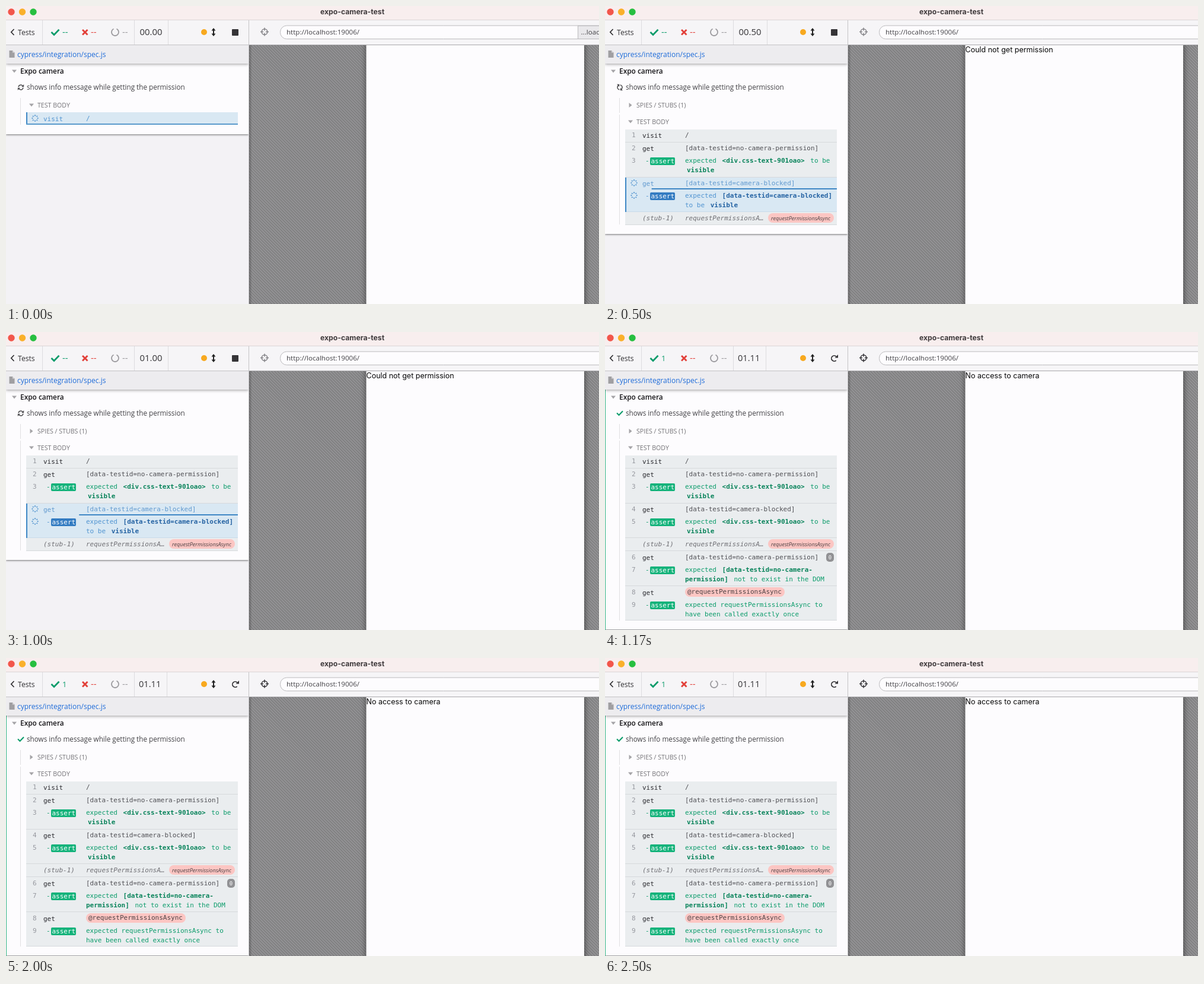
An HTML page with a canvas that plays this animation: 1000 px wide and 502 px high, repeating every 2.67 s.

```html
<!DOCTYPE html>
<html lang="en">
<head>
<meta charset="utf-8">
<title>Camera test run</title>
<style>
  html, body { margin: 0; width: 100%; height: 100%; overflow: hidden; background: #f4f3f5; }
  canvas { display: block; }
</style>
</head>
<body>
<canvas id="stage" width="1000" height="502"></canvas>
<script>
const ctx = document.getElementById('stage').getContext('2d');
const LOOP = 2670, PASSED = 1170, COMMAND_TIMEOUT = 4000;
const STEPS = [0, 170, 330, 500, 670, 830, 1000, PASSED];
const CLOCK = ['00.00', '00.21', '00.35', '00.50', '00.68', '00.84', '01.00', '01.11'];

const UI = '"Open Sans", sans-serif', MONO = '"DejaVu Sans Mono", monospace', SYSTEM = 'Inter, sans-serif';
const INK = '#343336', WHITE = '#fdfcfe', GREEN = '#0c9c6b', RED = '#e2403a';
const BLUE = '#3f87c5', PALE = '#d9e8f3', ROW = '#eaedef', PINK = '#fcc6c3';
const passedColors = [GREEN, '#08835a', '#14b37b'];
const runningColors = ['#5194d1', '#2563a3', '#347cc2'];

function rect(x, y, w, h, color) {
  ctx.fillStyle = color;
  ctx.fillRect(x, y, w, h);
}
function pill(x, y, w, h, r, color) {
  ctx.fillStyle = color;
  ctx.beginPath();
  ctx.roundRect(x, y, w, h, r);
  ctx.fill();
}
function dot(x, y, r, color) {
  ctx.fillStyle = color;
  ctx.beginPath();
  ctx.arc(x, y, r, 0, 7);
  ctx.fill();
}
function polygon(color, ...points) {
  ctx.fillStyle = color;
  ctx.beginPath();
  for (const [x, y] of points) ctx.lineTo(x, y);
  ctx.fill();
}
function stroke(color, width, ...points) {
  ctx.strokeStyle = color;
  ctx.lineWidth = width;
  ctx.beginPath();
  for (const [x, y] of points) ctx.lineTo(x, y);
  ctx.stroke();
}
function arc(x, y, r, from, to, color, width) {
  ctx.strokeStyle = color;
  ctx.lineWidth = width;
  ctx.beginPath();
  ctx.arc(x, y, r, from, to);
  ctx.stroke();
}
function text(str, x, y, color, size = 12, family = UI, style = '') {
  ctx.font = `${style} ${size}px ${family}`;
  ctx.fillStyle = color;
  ctx.fillText(str, x, y);
  return ctx.measureText(str).width;
}
const mono = (str, x, y, color, style) => text(str, x, y, color, 11, MONO, style);

function withShadow(color, blur, dy, paint) {
  ctx.save();
  ctx.shadowColor = color;
  ctx.shadowBlur = blur;
  ctx.shadowOffsetY = dy;
  paint();
  ctx.restore();
}

// Parts between asterisks are bold, with a small padding on both sides.
function message(str, x, y, [plain, strong]) {
  str.split('*').forEach((part, i) => {
    const bold = i % 2;
    if (bold) x += 3;
    x += mono(part, x, y, bold ? strong : plain, bold ? 'bold' : '');
    if (bold) x += 3;
  });
}

function check(x, y, size) {
  stroke(GREEN, size * 0.42, [x - size, y], [x - size * 0.3, y + size * 0.7], [x + size, y - size * 0.65]);
}
function caret(x, y, open) {
  if (open) polygon('#a5a4a7', [x - 4, y - 2.5], [x + 4, y - 2.5], [x, y + 2.5]);
  else polygon('#a5a4a7', [x - 2.5, y - 4], [x + 2.5, y], [x - 2.5, y + 4]);
}
function spinner(x, y, t) {
  for (let i = 0; i < 8; i++) {
    const a = i * Math.PI / 4 + t * Math.PI / 1000;
    dot(x + 4.6 * Math.cos(a), y + 4.6 * Math.sin(a), 1.1, '#4f92ce');
  }
}
function syncIcon(x, y, t) {
  ctx.save();
  ctx.translate(x, y);
  ctx.rotate(t * Math.PI / 1000);
  for (let i = 0; i < 2; i++) {
    arc(0, 0, 4, Math.PI * 1.05, Math.PI * 1.8, '#4d4c4f', 1.6);
    polygon('#4d4c4f', [5.2, -5], [5.2, -0.8], [1, -0.8]);
    ctx.rotate(Math.PI);
  }
  ctx.restore();
}
function redoIcon(x, y) {
  arc(x - 0.5, y + 0.5, 4.6, 0.8, 5.5, INK, 1.8);
  polygon(INK, [x + 6, y - 6], [x + 6, y - 0.6], [x + 0.6, y - 0.6]);
}

function group(top, bottom, running) {
  rect(34, top, 357, bottom - top, running ? PALE : ROW);
  rect(34, bottom - 1, 357, 1, running ? '#c9dbea' : '#d6d9dc');
  if (running) rect(34, top, 2, bottom - top, BLUE);
}
function command(number, name, arg, y, running, t) {
  const color = running ? '#6099cf' : '#505055';
  if (running) spinner(49, y - 4, t);
  else mono(number, 45, y, '#95979e');
  mono(name, 63, y + 1, running ? color : '#2a2a2f');
  mono(arg, 135, y, color);
}
function assertion(number, lines, y, running, t) {
  const colors = running ? runningColors : passedColors;
  if (running) spinner(49, y - 4, t);
  else mono(number, 45, y, '#95979e');
  mono('-', 68, y, colors[0]);
  pill(76, y - 9, 42, 13, 2, colors[2]);
  mono('assert', 77.5, y + 0.5, '#fff');
  lines.forEach(([str, x = 135], i) => message(str, x, y + 16 * i, colors));
}

function drawCommands(t, done) {
  caret(43, 167, false);
  text('SPIES / STUBS (1)', 53, 171, '#737276', 10.6);
  caret(43, 195, true);
  text('TEST BODY', 53, 199, '#737276', 10.6);
  rect(24, 155, 1, 25, '#e0dfe2');
  rect(24, 183, 1, done ? 303 : 185, '#e0dfe2');

  const visible = [['expected *<div.css-text-901oao>* to be'], ['*visible*']];
  group(208, 230);
  group(230, 289);
  group(289, 347, !done);
  group(347, 369);
  command('1', 'visit', '/', 221);
  command('2', 'get', '[data-testid=no-camera-permission]', 243);
  assertion('3', visible, 264);
  command('4', 'get', '[data-testid=camera-blocked]', 302, !done, t);
  assertion('5', done ? visible : [['expected *[data-testid=camera-blocked]*'], ['to be *visible*']], 323, !done, t);

  mono('(stub-1)', 63, 361, '#6f6f74', 'italic');
  mono('requestPermissionsA…', 135, 361, '#6f6f74', 'italic');
  pill(275, 349, 111, 16, 8, PINK);
  text('requestPermissionsAsync', 280, 360.5, '#4d4244', 9.1, UI, 'italic');

  if (!done) {
    const start = 34 + 357 * t / COMMAND_TIMEOUT;
    rect(start, 307, 391 - start, 2, BLUE);
    return;
  }
  group(369, 428);
  group(428, 486);
  command('6', 'get', '[data-testid=no-camera-permission]', 383);
  pill(373, 372, 13, 15, 5, '#919194');
  text('0', 376.8, 383, '#fff', 9, MONO);
  assertion('7', [['expected *[data-testid=no-camera-*'], ['*permission]* not to exist in the DOM', 132]], 404);
  command('8', 'get', '', 442);
  pill(135, 430, 168, 16, 8, PINK);
  mono('@requestPermissionsAsync', 139, 441, '#4d4244');
  assertion('9', [['expected requestPermissionsAsync to'], ['have been called exactly once']], 463);
}

function drawReporter(t, loading, done) {
  const bottom = loading ? 216 : done ? 501 : 384;
  rect(0, 66, 410, 436, '#f3f2f5');
  withShadow('rgba(0,0,0,.55)', 3, 1, () => rect(0, 97, 409, bottom - 97, WHITE));
  if (done) rect(0, 97, 1, 405, '#35b587');

  caret(14, 110, true);
  text('Expo camera', 24, 114, '#141316', 11.9, UI, '600');
  if (done) check(25, 136.5, 5);
  else syncIcon(25, 137, t);
  text('shows info message while getting the permission', 35, 140.5, '#434246', 11.7);

  if (loading) {
    caret(43, 167, true);
    text('TEST BODY', 53, 171, '#737276', 10.6);
    rect(24, 155, 1, 45, '#e0dfe2');
    rect(34, 179, 357, 21, PALE);
    rect(34, 179, 2, 21, BLUE);
    rect(34, 198, 357, 2, '#5a9acc');
    spinner(49, 189, t);
    mono('visit', 63, 194, runningColors[0]);
    mono('/', 135, 193, runningColors[0]);
  } else drawCommands(t, done);

  withShadow('rgba(0,0,0,.4)', 5, 1, () => rect(0, 66, 409, 31, '#edecef'));
  polygon('#a09fa2', [5.5, 75], [11, 75], [14.5, 78.5], [14.5, 87], [5.5, 87]);
  polygon('#d9d8db', [11, 75], [14.5, 78.5], [11, 78.5]);
  text('cypress/integration/spec.js', 19, 85.5, '#1f6cd9');
}

function drawPage(loading, done) {
  ctx.save();
  ctx.beginPath();
  ctx.rect(410, 66, 590, 436);
  ctx.clip();
  rect(410, 66, 590, 436, '#808081');
  for (let x = -30; x < 1000; x += 5) stroke('#959497', 1.7, [x, 66], [x + 436, 502]);
  withShadow('rgba(0,0,0,.6)', 10, 0, () => rect(607.5, 60, 367.5, 450, WHITE));
  const edge = ctx.createLinearGradient(410, 0, 415, 0);
  edge.addColorStop(0, 'rgba(0,0,0,.25)');
  edge.addColorStop(1, 'rgba(0,0,0,0)');
  rect(410, 66, 5, 436, edge);
  ctx.restore();
  if (!loading) text(done ? 'No access to camera' : 'Could not get permission', 607.5, 78, '#080808', 12.5, SYSTEM);
}

function drawToolbar(clock, loading, done) {
  rect(0, 23, 1000, 43, '#f6f5f7');
  rect(0, 65, 410, 1, '#c4c3c6');
  rect(410, 65, 590, 1, '#a9a8ab');
  for (const x of [61, 216, done ? 271 : 273]) rect(x, 24, 1, 41, '#dddcdf');
  rect(409, 24, 1, 478, '#c4c3c6');

  stroke(INK, 1.8, [13.5, 39], [8.8, 44], [13.5, 49]);
  text('Tests', 20, 48.5, INK, 12.2, UI, '500');
  check(83, 44, 6.5);
  text(done ? '1' : '--', 95, 48.5, GREEN, done ? 13 : 15);
  stroke(RED, 2.8, [129, 40], [137.5, 48.5]);
  stroke(RED, 2.8, [137.5, 40], [129, 48.5]);
  text('--', 143, 48.5, RED, 15);
  arc(184, 44, 6, -1.15, 4.3, '#9b9a9e', 1.8);
  text('--', 196, 48.5, '#9b9a9e', 15);
  text(clock, done ? 224 : 225.5, 49, INK, done ? 14.6 : 14.9);

  dot(334, 44, 5, '#f8a91f');
  rect(349, 40, 2, 8, '#222');
  polygon('#222', [350, 37], [353.5, 41.5], [346.5, 41.5]);
  polygon('#222', [350, 51], [353.5, 46.5], [346.5, 46.5]);
  if (done) redoIcon(387, 44);
  else pill(381, 39, 11, 11, 1, '#353437');

  const aim = done ? '#333236' : '#858488';
  arc(436, 43.5, 4.8, 0, 7, aim, 1.5);
  for (const [dx, dy] of [[1, 0], [-1, 0], [0, 1], [0, -1]])
    stroke(aim, 1.5, [436 + dx * 2, 43.5 + dy * 2], [436 + dx * 7, 43.5 + dy * 7]);

  pill(462.5, 33, 560, 22.5, 11, WHITE);
  ctx.strokeStyle = '#bbbabd';
  ctx.lineWidth = 1;
  ctx.stroke();
  text('http://localhost:19006/', 473, 48, '#434246', 11.6);
  if (loading) {
    rect(964, 33, 36, 22, '#e9e8eb');
    rect(964, 33, 1, 22, '#bbbabd');
    rect(964, 33, 36, 1, '#bbbabd');
    rect(964, 55, 36, 1, '#bbbabd');
    text('...loading', 969.5, 48, '#434246', 11.6);
  }
}

function drawTitleBar() {
  rect(0, 0, 1000, 23, '#f8eeee');
  rect(0, 23, 1000, 1, '#dcd5d6');
  dot(9, 10, 5.7, '#f2564b');
  dot(27.5, 10, 5.7, '#fab02a');
  dot(46, 10, 5.7, '#27bf40');
  text('expo-camera-test', 530, 14, '#403b3d', 12.2, SYSTEM, 'bold');
}

function draw(now) {
  const time = now % LOOP;
  const step = STEPS.findLastIndex(start => start <= time);
  const t = STEPS[step], loading = step === 0, done = t === PASSED;
  drawReporter(t, loading, done);
  drawPage(loading, done);
  drawToolbar(CLOCK[step], loading, done);
  drawTitleBar();
  requestAnimationFrame(draw);
}
draw(performance.now());
</script>
</body>
</html>
```
